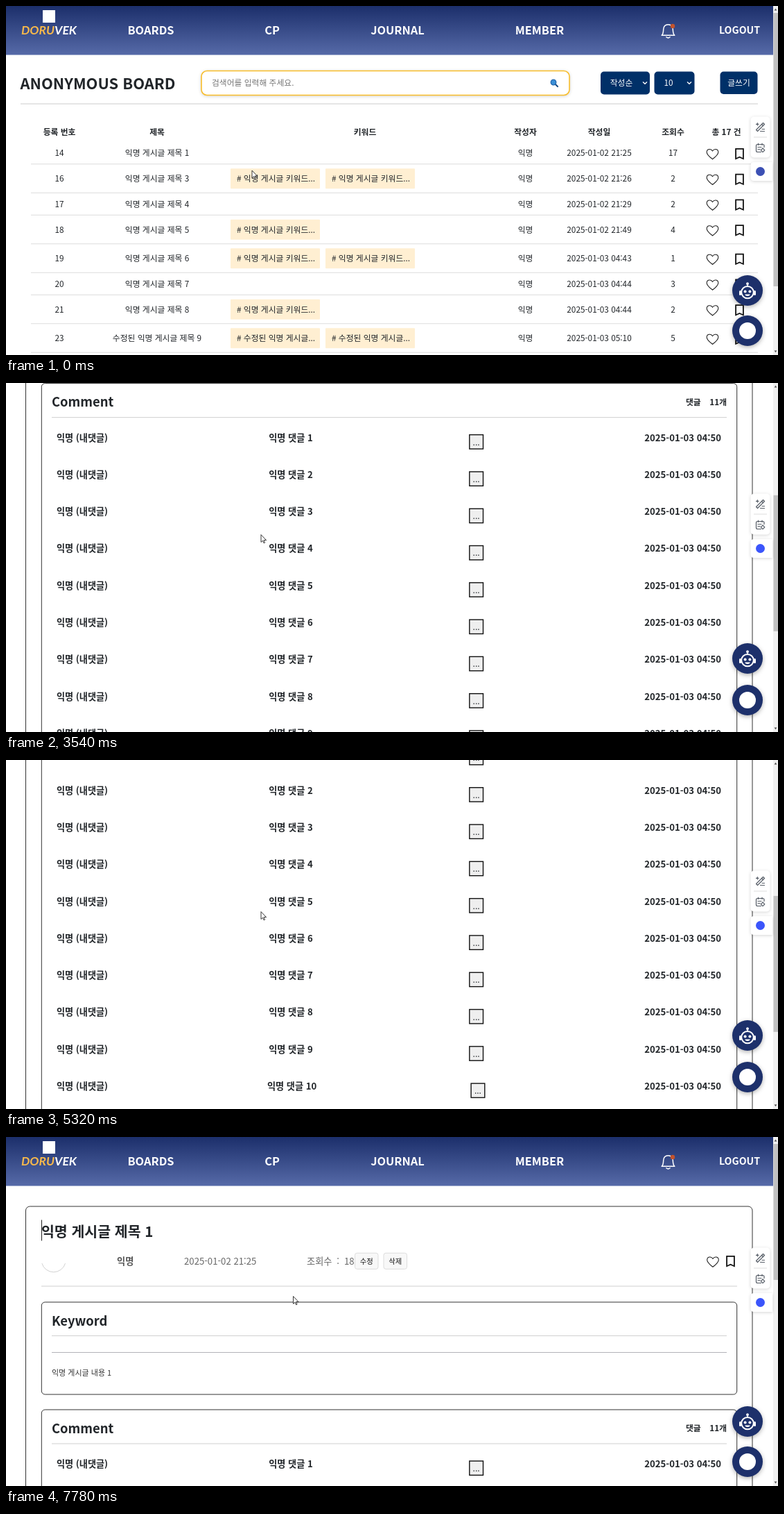
An HTML page that plays this animation: 1114 px wide and 503 px high, repeating every 7.91 s.

```html
<!DOCTYPE html>
<html lang="ko">
<head>
<meta charset="utf-8">
<title>Anonymous board</title>
<style>
  html, body { margin: 0; width: 100%; height: 100%; overflow: hidden; background: #fff; }
  svg { display: block; width: 100%; height: 100%; font-family: "Noto Sans CJK KR", "Noto Sans CJK", "Noto Sans", sans-serif; }
  text { white-space: pre; }
  .soft { filter: drop-shadow(0 1px 2px rgba(0,0,0,.17)); }
  .float { filter: drop-shadow(0 2px 3px rgba(0,0,0,.3)); }
</style>
</head>
<body>
<svg id="stage" viewBox="0 0 1114 503" xmlns="http://www.w3.org/2000/svg"></svg>
<script>
const LOOP = 7910, MAX_SCROLL = 742;
const INK = '#212529', NAVY = '#003068', LINE = '#d0d0d0';

// ---- drawing helpers ----
const text = (x, y, s, { size = 11.8, weight = 400, fill = INK, anchor = 'start' } = {}) =>
  `<text x="${x}" y="${y + size * .375}" font-size="${size}" font-weight="${weight}" fill="${fill}" text-anchor="${anchor}">${s}</text>`;
const mid = (x, y, s, o) => text(x, y, s, { anchor: 'middle', ...o });
const rect = (x, y, w, h, rx = 0, attrs = '') =>
  `<rect x="${x}" y="${y}" width="${w}" height="${h}" rx="${rx}" ${attrs}/>`;
const frame = (x, y, w, h, rx, fill = '#fff') => rect(x, y, w, h, rx, `fill="${fill}" stroke="#333"`);
const rule = (x1, x2, y, color = LINE) => `<path d="M${x1} ${y}H${x2}" stroke="${color}"/>`;
const path = (d, stroke, width = 1, fill = 'none') =>
  `<path d="${d}" stroke="${stroke}" stroke-width="${width}" fill="${fill}" stroke-linejoin="round" stroke-linecap="round"/>`;
const group = (id, body, attrs = '') => `<g id="${id}" ${attrs}>${body}</g>`;
const place = (x, y, body) => `<g transform="translate(${x} ${y})">${body}</g>`;

const heart = (x, y) => place(x, y,
  path('M0 7.3C-5 3.4-8.3.6-8.3-2.8C-8.3-7.6-2.4-8.6 0-4.4C2.4-8.6 8.3-7.6 8.3-2.8C8.3.6 5 3.4 0 7.3Z', '#222', 1.1));
const bookmark = (x, y) => place(x, y,
  '<path d="M-5.4-7.2H5.4V7.2L0 4.8L-5.4 7.2Z" fill="none" stroke="#111" stroke-width="1.8"/>');
const chevron = (x, y) => path(`M${x - 2.6} ${y - 1.3}l2.6 2.6 2.6-2.6`, '#fff', 1.3);

// ---- page header ----
function header() {
  const nav = [['BOARDS', 209], ['CP', 384], ['JOURNAL', 565], ['MEMBER', 770]];
  const white = { weight: 700, fill: '#fff' };
  return rect(0, 0, 1107, 70.5, 0, 'fill="url(#sky)"') +
    rect(53, 6, 18, 18, 0, 'fill="#fff"') +
    `<text x="62" y="41" text-anchor="middle" font-family="Lato, sans-serif" font-size="17.5" font-weight="700" font-style="italic" fill="#f7b84b">DORU<tspan fill="#fff">VEK</tspan></text>` +
    nav.map(([s, x]) => mid(x, 35, s, { size: 16.4, ...white })).join('') +
    mid(1058.5, 35, 'LOGOUT', { size: 14.2, ...white }) +
    place(955.5, 36,
      path('M-9.3 6.3C-6.8 4-7 1-6.8-2.5C-6.5-7-3.5-9.3 0-9.3S6.5-7 6.8-2.5C7 1 6.8 4 9.3 6.3Z', '#fff', 1.5) +
      path('M-2.6 8.8Q0 11 2.6 8.8', '#fff', 1.5) +
      '<circle cx="6.5" cy="-7" r="3.2" fill="#c2532d"/>');
}

// ---- list page ----
function listPage() {
  const rows = [
    [14, 1, 0, '02 21:25', 17], [16, 3, 2, '02 21:26', 2], [17, 4, 0, '02 21:29', 2], [18, 5, 1, '02 21:49', 4],
    [19, 6, 2, '03 04:43', 1], [20, 7, 0, '03 04:44', 3], [21, 8, 1, '03 04:44', 2], [23, 9, 2, '03 05:10', 5]
  ];
  const heads = [['등록 번호', 77], ['제목', 218], ['키워드', 518], ['작성자', 749.5], ['작성일', 856], ['조회수', 962.5], ['총 17 건', 1039.5]];
  const white = { fill: '#fff', weight: 500 };
  let out = text(20.5, 112, 'ANONYMOUS BOARD', { size: 21.9, weight: 700 }) +
    rect(282, 93.5, 531, 35, 8, 'fill="#fff" stroke="#f8bd2b" stroke-width="1.6" class="soft"') +
    text(297, 111, '검색어를 입력해 주세요.', { fill: '#777' }) +
    path('M792.5 112.5L796 116', '#1d4f86', 2.2) +
    '<circle cx="790" cy="110" r="3.8" fill="#3b8fd6" stroke="#1f66ae" stroke-width="1.3"/>' +
    rect(858, 94.5, 71, 33, 5, `fill="${NAVY}"`) + mid(888, 111, '작성순', white) + chevron(922, 111) +
    rect(935.5, 94.5, 58, 33, 5, `fill="${NAVY}"`) + mid(956, 111, '10', white) + chevron(986, 111) +
    rect(1030.5, 94.5, 54, 32.5, 5, `fill="${NAVY}"`) + mid(1057.5, 111, '글쓰기', white) +
    rule(21, 1085, 141, '#ccc') +
    heads.map(([s, x]) => mid(x, 182, s, { weight: 700 })).join('');

  let top = 196;
  for (const [id, n, tags, date, views] of rows) {
    const h = tags ? 41.5 : 32, y = top + h / 2, edited = n === 9;
    out += mid(77, y, id) + mid(218, y, `${edited ? '수정된 ' : ''}익명 게시글 제목 ${n}`);
    for (let i = 0; i < tags; i++) {
      out += rect(324 + 137 * i, y - 14.5, 129, 29, 1, 'fill="#ffefd2"') +
        text(333 + 137 * i, y, edited ? '# 수정된 익명 게시글...' : '# 익명 게시글 키워드...');
    }
    out += mid(749.5, y, '익명') + mid(856, y, '2025-01-' + date) + mid(962.5, y, views) +
      heart(1019.5, y + 1.5) + bookmark(1058.5, y + 1);
    top += h;
    out += rule(36, 1085, top - .2, '#dcdcdc');
  }
  return out;
}

// ---- post page ----
function comment(i) {
  const y = 471 + 53.3 * i, shift = i === 9 ? 2.3 : 0, bold = { size: 13.15, weight: 700 };
  return text(73, y, '익명 (내댓글)', bold) +
    mid(411 + shift * .7, y, `익명 댓글 ${i + 1}`, bold) +
    rect(668.8 + shift, y - 4, 19.7, 20.4, 0, 'fill="#efefef" stroke="#111" stroke-width="1.4"') +
    mid(678.6 + shift, y + 6.5, '...', { size: 12, weight: 500 }) +
    text(1032, y, '2025-01-03 04:50', { ...bold, anchor: 'end' });
}

function postPage() {
  const meta = { size: 13.2, fill: '#666' };
  const small = (x, s) => rect(x, 167.3, 33.5, 23, 3, 'fill="#f8f8f8" stroke="#ddd"') + mid(x + 16.8, 179, s, { size: 10.3, weight: 500, fill: '#111' });
  return frame(28.5, 100, 1048.5, 1117, 6) +
    text(51, 136, '익명 게시글 제목 1', { size: 20.5, weight: 700 }) +
    path('M52 182.5A17.3 16.5 0 0 0 85.4 182.5', '#ccc', .9) +
    text(160, 179, '익명', { size: 13.2, weight: 700, fill: '#555' }) +
    text(257, 179, '2025-01-02 21:25', meta) +
    text(434, 179, '조회수', meta) + mid(479, 179, ':', meta) + text(488, 179, '18', meta) +
    small(503.5, '수정') + small(545, '삭제') +
    heart(1020, 180) + bookmark(1045.5, 179) +
    rule(51, 1055, 215) +

    frame(51.3, 238, 1003.4, 133, 5) +
    text(66, 265, 'Keyword', { size: 18.4, weight: 700 }) +
    rule(66, 1040, 286.5) + rule(66, 1040, 310.5, '#b2b2b8') +
    text(66, 339.5, '익명 게시글 내용 1', { size: 11, fill: '#333' }) +

    frame(51.3, 393, 1003.4, 634, 5) +
    text(66, 420, 'Comment', { size: 18.4, weight: 700 }) +
    text(981, 419.5, '댓글', { weight: 700 }) + text(1040, 419.5, '11개', { weight: 700, anchor: 'end' }) +
    rule(66, 1040, 442) +
    Array.from({ length: 10 }, (_, i) => comment(i)).join('') +
    rect(526, 987, 23.3, 24.5, 3, 'fill="#007bff"') + mid(537.6, 999.5, '1', { size: 12, fill: '#fff' }) +
    rect(555.5, 987, 23.3, 24.5, 3, 'fill="#fff" stroke="#ddd"') + mid(567.1, 999.5, '2', { size: 12 }) +

    frame(51.3, 1049, 1003.4, 145.5, 3) +
    text(58, 1066, '불편함을 주는 댓글은 자제 부탁드리며, 따뜻한 댓글로 배려해 주세요.', { fill: '#6c6c6c' }) +
    text(1038, 1065.5, '0 / 1000', { fill: '#6c6c6c', anchor: 'end' }) +
    rect(982, 1165.5, 65, 22, 5, 'fill="#fff" stroke="#1b3a70"') +
    mid(1014.5, 1177, '댓글 달기', { weight: 700, fill: '#0c2a5c' });
}

// ---- fixed overlays ----
function sidePanels() {
  const c = '#555c66';
  return `<g class="soft">${rect(1074.5, 159.5, 28, 59, 5, 'fill="#fff"')}<path d="M1106 225H1079.5Q1074.5 225 1074.5 230V247Q1074.5 252 1079.5 252H1106Z" fill="#fff"/></g>` +
    rule(1079, 1098, 189, '#ddd') +
    place(1088.5, 174.5,
      path('M-6 4L4-6L6-4L-4 6Z', c, 1.2) +
      path('M-4.2-6V-2.4M-6-4.2H-2.4M0 6H6M2.5 3H6M2-4L4-2', c, 1.2)) +
    place(1088.5, 204.5,
      path('M1 6H-4Q-6 6-6 4V-3Q-6-5 -4-5H3.5Q5.5-5 5.5-3V-1M-3-6.5V-4M2.5-6.5V-4M-3.5-1H1.5M-3.5 2H-.5', c, 1.2) +
      path('M3.5.5L6.3 3.3L3.5 6.1L.7 3.3Z', c, 1.2)) +
    '<circle id="badge" cx="1088.5" cy="238.5" r="6.5"/>';
}

const disc = '<circle r="22" fill="#1d306b" class="float"/>';
const robot = disc +
  '<circle cy="-9.8" r="1.9" fill="#fff"/>' + path('M0-8V-6', '#fff', 1.5) +
  rect(-12, 0, 3, 7, 1.5, 'fill="#fff"') + rect(9, 0, 3, 7, 1.5, 'fill="#fff"') +
  '<ellipse cy="2.6" rx="8.8" ry="8.6" fill="none" stroke="#fff" stroke-width="2"/>' +
  '<circle cx="-3.4" cy="1.6" r="2" fill="#fff"/><circle cx="3.4" cy="1.6" r="2" fill="#fff"/>' +
  path('M-3 6.2Q0 8.6 3 6.2Z', '#fff', 1.2, '#fff');
const chat = disc + '<circle r="12" fill="#fff"/>';

const stage = document.getElementById('stage');
stage.innerHTML =
  '<defs><linearGradient id="sky" x2="0" y2="1"><stop stop-color="#1c2f6b"/><stop offset="1" stop-color="#566aa8"/></linearGradient></defs>' +
  rect(0, 0, 1114, 503, 0, 'fill="#fff"') +
  group('page', header() + group('list', listPage()) + group('post', postPage() + rect(51, 119.5, 1, 30, 0, 'id="caret" fill="#222"'))) +
  rect(1107, 0, 7, 503, 0, 'fill="#f1f1f1"') +
  '<path d="M1108.6 6.5L1110.5 3.5L1112.4 6.5ZM1108.6 496.5L1110.5 499.5L1112.4 496.5Z" fill="#555"/>' +
  rect(1107.5, 10, 6.5, 196, 0, 'id="thumb" fill="#c1c1c1"') +
  sidePanels() + group('robot', robot) + group('chat', chat) +
  group('cursor', path('M0 0V10.4L2.5 8.2L4.1 11.8L5.6 11.1L4 7.6H7.2Z', '#222', .9, '#fff'));

const el = {};
for (const id of ['page', 'list', 'post', 'caret', 'thumb', 'badge', 'robot', 'chat', 'cursor']) el[id] = document.getElementById(id);

// ---- motion ----
const clamp = v => Math.max(0, Math.min(1, v));
function along(keys, t) {
  let [t0, v0] = keys[0];
  for (const [t1, v1] of keys) {
    if (t < t1) return t1 === t0 ? v0 : v0 + (v1 - v0) * clamp((t - t0) / (t1 - t0));
    [t0, v0] = [t1, v1];
  }
  return v0;
}

const scrollKeys = [[3010, 0], [3540, 391.7], [4040, MAX_SCROLL], [4710, MAX_SCROLL], [5320, 481], [6210, 100.5], [6290, 75], [6520, 0]];
const cursorX = [[650, 355], [920, 231], [1720, 231], [1920, 368], [7080, 368], [7300, 414.5]];
const cursorY = [[650, 237.5], [920, 212], [1720, 212], [1920, 219], [7080, 219], [7300, 230]];
const rides = [[3010, 4040], [4710, 6520]];

// The round buttons rise while the page scrolls and sink back afterwards.
function lift(t, power) {
  let v = 0;
  for (const [from, to] of rides) {
    if (t >= from) v = t < to ? Math.max(v, clamp((t - from) / 220)) : Math.pow(1 - clamp((t - to) / 800), power);
  }
  return v;
}

const move = (node, x, y) => node.setAttribute('transform', `translate(${x.toFixed(2)} ${y.toFixed(2)})`);

function draw(t) {
  const scroll = along(scrollKeys, t), swap = clamp((t - 1290) / 290), opened = t >= 1390;
  move(el.page, 0, -scroll);
  el.list.setAttribute('opacity', 1 - swap);
  el.post.setAttribute('opacity', swap);
  el.caret.setAttribute('opacity', Math.floor((t - 7780) / 541.2) % 2 === 0 ? 1 : 0);
  el.thumb.setAttribute('y', 10 + scroll * 287 / MAX_SCROLL);
  el.thumb.setAttribute('height', opened ? 196 : 394);
  el.badge.setAttribute('fill', t < 2120 ? '#3c50b4' : '#3b55fb');
  move(el.robot, 1070, 410 - 13 * lift(t, 1));
  move(el.chat, 1070, 468 - 11 * lift(t, 2));
  move(el.cursor, along(cursorX, t), along(cursorY, t));
}

const start = performance.now();
(function tick() {
  draw((performance.now() - start) % LOOP);
  requestAnimationFrame(tick);
})();
</script>
</body>
</html>
```
